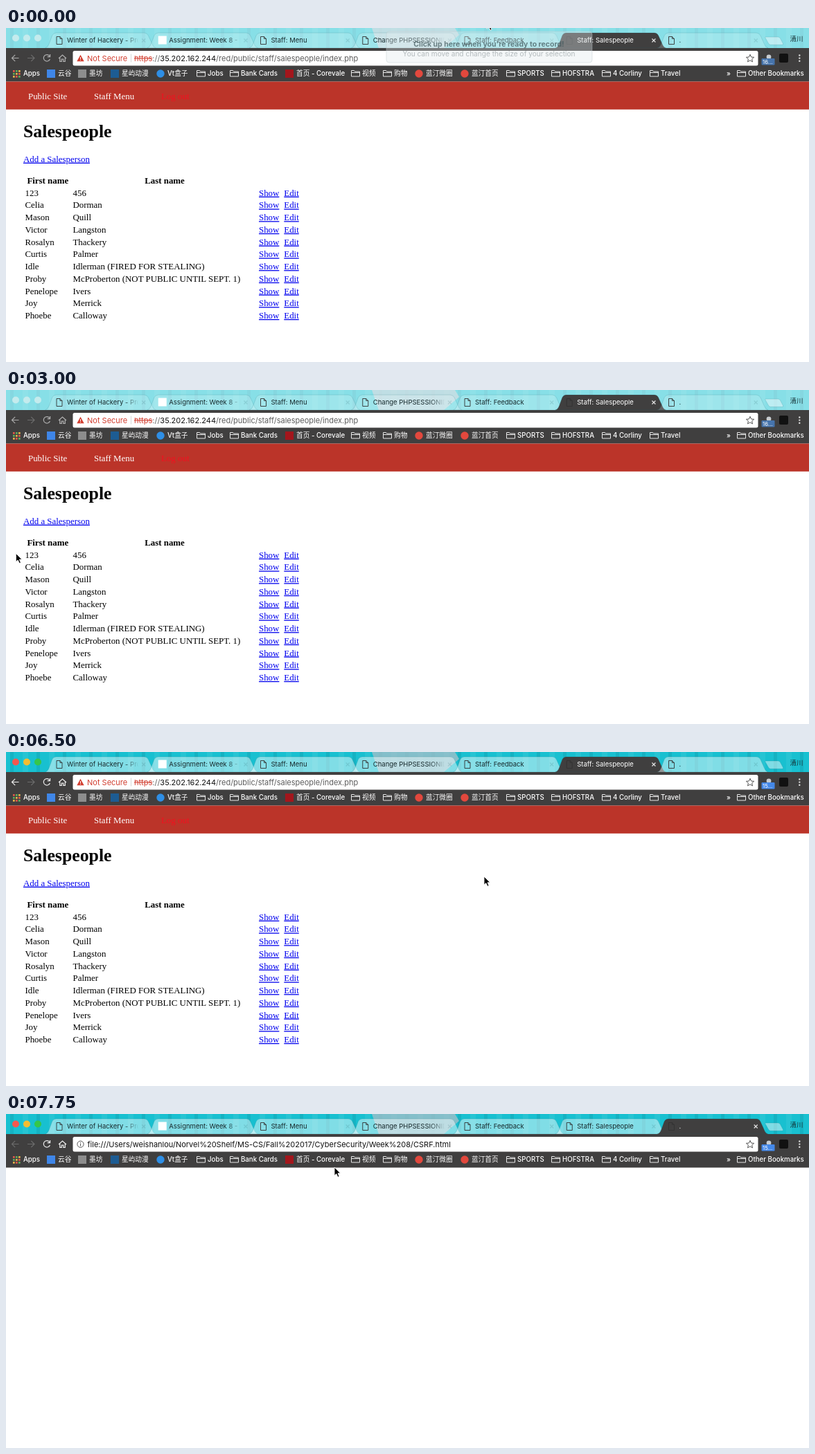
These frames come from a looping animation (1159 by 483 pixels, 8 s). An HTML page:

```html
<!DOCTYPE html>
<html lang="en">
<head>
<meta charset="utf-8">
<title>Salespeople</title>
<style>
html, body { margin: 0; width: 100%; height: 100%; overflow: hidden; background: #fff; }
svg { display: block; width: 100%; height: 100%; }
text { white-space: pre; }
.ui { font-family: Inter, "Noto Sans CJK SC", "Noto Sans CJK", sans-serif; font-size: 9.5px; }
.mark { font-size: 9.7px; font-weight: 500; fill: #fff; }
.url { font-size: 11px; fill: #111; }
.page { font-family: "Liberation Serif", "Times New Roman", serif; font-size: 12.9px; }
.link { fill: #0000ee; text-decoration: underline; }
.bold { font-weight: 700; }
.mid { text-anchor: middle; }
.line { fill: none; stroke-width: 1.2; }
</style>
</head>
<body>
<svg id="stage" viewBox="0 0 1159 483" xmlns="http://www.w3.org/2000/svg"></svg>
<script>
const LOOP = 8000, STEP = 250, PITCH = 147.25, BAR = '#403f3f';
const TITLES = ['Winter of Hackery - Pro', 'Assignment: Week 8 - Lab', 'Staff: Menu',
  'Change PHPSESSIONID', 'Staff: Feedback', 'Staff: Salespeople', '.'];
const PEOPLE = ['123|456', 'Celia|Dorman', 'Mason|Quill', 'Victor|Langston', 'Rosalyn|Thackery',
  'Curtis|Palmer', 'Idle|Idlerman (FIRED FOR STEALING)',
  'Proby|McProberton (NOT PUBLIC UNTIL SEPT. 1)', 'Penelope|Ivers', 'Joy|Merrick', 'Phoebe|Calloway'];
// label, x, icon: f = folder, s = square, c = circle
const MARKS = [['Apps', 25, ''], ['云谷', 75, 's#3f86e8'], ['墨坊', 120, 's#8d8d8d'],
  ['星屿动漫', 167, 's#1d5c93'], ['Vt盒子', 233, 'c#2e8fe6'], ['Jobs', 291, 'f'],
  ['Bank Cards', 339, 'f'], ['首页 - Corevale', 419, 's#a3161c'], ['视频', 514, 'f'],
  ['购物', 560, 'f'], ['蓝汀微圈', 606, 'c#e2483d'], ['蓝汀首页', 672, 'c#e2483d'],
  ['SPORTS', 738, 'f'], ['HOFSTRA', 803, 'f'], ['4 Corliny', 876, 'f'], ['Travel', 945, 'f'],
  ['Other Bookmarks', 1071, 'f']];
// time, x, y of the pointer tip
const PATH = [[0, 694, -11], [250, 610, 20], [500, 470, 110], [750, 399, 172], [1250, 368, 218],
  [1750, 190, 242], [2250, 22, 234], [2500, 7, 231], [3250, 18, 239], [3750, 52, 237],
  [4250, 44, 234], [4500, 22, 237], [4750, 72, 240], [5000, 150, 240], [5500, 416, 237],
  [5750, 567, 245], [6250, 567, 245], [6500, 690, 180], [6750, 890, 62], [7000, 988, 13],
  [7500, 988, 13], [7750, 474, 77]];
const CELLS = [[27, 50], [96, 119], [364.5, 397], [401, 423]];

const text = (x, y, s, cls, more = '') => `<text x="${x}" y="${y}" class="${cls}" ${more}>${s}</text>`;
const rect = (x, y, w, h, fill, more = '') =>
  `<rect x="${x}" y="${y}" width="${w}" height="${h}" fill="${fill}" ${more}/>`;
const circle = (x, y, r, fill, more = '') => `<circle cx="${x}" cy="${y}" r="${r}" fill="${fill}" ${more}/>`;
const path = (d, more) => `<path d="${d}" ${more}/>`;

function fade(id, color) {
  return `<linearGradient id="${id}" gradientUnits="userSpaceOnUse" x1="31" y1="0" x2="135" y2="0">
    <stop offset=".8" stop-color="${color}"/><stop offset="1" stop-color="${color}" stop-opacity="0"/></linearGradient>`;
}

function tab(title, i) {
  const icon = i === 1 ? rect(16, 11.5, 12, 12, '#fff')
    : path('M16.5 12.5h5l3 3v8h-8zM21.5 12.5v3h3', 'class="line" style="stroke-width:.9" stroke="#333"');
  return `<g class="tab" transform="translate(${56.5 + PITCH * i})">
    ${path('M0 29Q4 28 6 22L10 11Q12 7 16 7H143Q147 7 149 11L154 22Q156 28 160 29Z', 'stroke="#176972" stroke-opacity=".24" stroke-width=".7"')}
    ${icon}${text(31.5, 21, title, 'ui')}
    ${path('M139.7 15.5l5 5m0-5l-5 5', 'class="line close"')}</g>`;
}

function bookmark([label, x, icon]) {
  const color = icon.slice(1);
  let mark = '';
  if (icon === 'f') mark = path(`M${x - 15.5} 70v-8.5h4l1.2 1.5h6.8v7zM${x - 15.5} 64.5h12`,
    'class="line" style="stroke-width:1" stroke="#e6e6e6"');
  else if (icon[0] === 's') mark = rect(x - 16, 60, 12, 12, color);
  else if (icon[0] === 'c') mark = circle(x - 10, 66, 5.7, color);
  else for (let n = 0; n < 9; n++)
    mark += rect(10 + n % 3 * 4, 61 + (n / 3 | 0) * 4, 2.7, 2.7, ['#e25a4b', '#5fae5b', '#e8b34a'][(n + (n / 3 | 0)) % 3]);
  return mark + text(x, 69.4, label, 'ui mark');
}

function person(row, i) {
  const y = (242.7 + 17.73 * i).toFixed(1), [first, last] = row.split('|');
  return text(27.5, y, first, 'page') + text(96.5, y, last, 'page')
    + text(365, y, 'Show', 'page link') + text(401.3, y, 'Edit', 'page link');
}

const stage = document.getElementById('stage');
stage.innerHTML = `<defs>${fade('ink', '#16292c')}${fade('pale', '#fff')}
  <pattern id="bars" width="38" height="29" patternUnits="userSpaceOnUse">
    ${rect(6, 0, 5, 29, '#087f93', 'opacity=".22"')}${rect(24, 0, 8, 29, '#fff', 'opacity=".06"')}</pattern></defs>
  ${rect(0, 0, 1159, 483, '#fff')}
  ${rect(0, 0, 1159, 30, '#18c0d0')}${rect(0, 0, 1159, 30, 'url(#bars)')}
  ${path('M538 29L528 0H648L654 10L632 29Z', 'fill="#a9bfc9" opacity=".75"')}
  <rect id="veil" width="1159" height="30" fill="#fff" opacity=".48"/>
  <g id="lights">${[14, 30, 46].map(x => circle(x, 14.5, 5)).join('')}</g>
  <g id="tabs">${TITLES.map(tab).join('')}</g>
  ${path('M1096.5 13h18q2 0 3 2l4 7.5q.8 1.8-1 1.8h-17q-2 0-3-2l-4.5-8q-.5-1.3.5-1.3z', 'fill="#fff" fill-opacity=".45" stroke="#176972" stroke-opacity=".25" stroke-width=".7"')}
  ${text(1131.5, 18.8, '清川', 'ui', 'fill="#163034"')}
  ${rect(0, 29, 1159, 48.5, BAR)}
  ${path('M18.5 43.5h-10m4.7-4.7l-4.7 4.7l4.7 4.7', 'id="back" class="line"')}
  ${path('M31 43.5h10m-4.7-4.7l4.7 4.7l-4.7 4.7', 'class="line" stroke="#6c6c6c"')}
  <g id="tools">
    ${path('M62.8 40.6A4.7 4.7 0 1 0 63.4 45M63.6 38v3.7h-3.8', 'class="line"')}
    ${path('M76 44l5.5-5l5.5 5M77.8 43.3v5h2.5v-3.2h2.5v3.2h2.5v-5', 'class="line"')}
  </g>
  ${rect(96.5, 33, 989, 21.5, '#fff', 'rx="2.5"')}
  <g id="webUrl">
    ${path('M107.5 38.8l5.2 9.4h-10.4z', 'fill="#d23f31"')}${rect(107, 42, 1, 3.2, '#fff')}${rect(107, 46, 1, 1, '#fff')}
    ${text(117, 47.7, 'Not Secure', 'ui url', 'style="fill:#d23f31"')}
    ${rect(180, 37.5, .8, 12, '#ccc')}
    ${text(185, 47.7, '<tspan fill="#d23f31" text-decoration="line-through">https</tspan><tspan fill="#666">://</tspan>35.202.162.244<tspan fill="#5c5c5c">/red/public/staff/salespeople/index.php</tspan>', 'ui url')}
  </g>
  <g id="fileUrl">
    ${circle(107.5, 43.7, 4.6, 'none', 'stroke="#555" stroke-width="1"')}
    ${rect(107, 41, 1, 1.2, '#555')}${rect(107, 43, 1, 3.4, '#555')}
    ${text(117.5, 47.7, 'file:///Users/weishanlou/Norvel%20Shelf/MS-CS/Fall%202017/CyberSecurity/Week%208/CSRF.html', 'ui url')}
  </g>
  ${path('M1074 38.3l1.6 3.7l4 .3l-3 2.6l.9 4l-3.5-2.1l-3.5 2.1l.9-4l-3-2.6l4-.3z', 'class="line" style="stroke-width:1" stroke="#555"')}
  ${circle(1101, 41.8, 3.4, '#c8ccd0')}
  <rect id="badge" x="1090.5" y="44" width="19" height="9.5" rx="1"/>
  <text id="count" x="1092" y="51.6" class="ui" style="font-size:7.8px" fill="#fff"></text>
  ${rect(1116, 37, 13, 13, '#111', 'rx="2"')}
  ${[39.5, 43.6, 47.7].map(y => circle(1145.3, y, 1.2, '#ddd')).join('')}
  ${MARKS.map(bookmark).join('')}${text(1040, 69, '»', 'ui mark')}
  <g id="page">
    ${rect(0, 77.5, 1159, 40.3, '#bb3429')}
    ${text(32, 102.5, 'Public Site', 'page', 'fill="#fff"')}
    ${text(127, 102.5, 'Staff Menu', 'page', 'fill="#fff"')}
    ${text(224, 102.5, 'Log out', 'page', 'fill="#f3101f"')}
    ${text(25, 158.2, 'Salespeople', 'page bold', 'style="font-size:25.8px"')}
    ${text(25, 193.7, 'Add a Salesperson', 'page link')}
    ${text(60.3, 225, 'First name', 'page bold mid')}
    ${text(229, 225, 'Last name', 'page bold mid')}
    <g id="picked">${CELLS.map(([x]) => rect(x, 231.3, 0, 14.6, '#b2d5fc')).join('')}</g>
    ${PEOPLE.map(person).join('')}
  </g>
  <g id="hint">
    ${rect(549, 5, 297, 45, '#dfe8ea', 'rx="4" fill-opacity=".36" stroke="#b9c6c8" stroke-opacity=".4"')}
    ${text(697, 26.5, "Click up here when you're ready to record!", 'ui bold mid', 'style="font-size:10.5px" fill="#40575c" fill-opacity=".72"')}
    ${text(697, 40.6, 'You can move and change the size of your selection', 'ui mid', 'style="font-size:10.1px" fill="#8c9699" fill-opacity=".62"')}
  </g>
  ${path('M0 0V12.2L2.8 9.6L5 14.3L7.1 13.4L5 8.8H8.8Z', 'id="pointer" fill="#000" stroke="#fff" stroke-width=".9" stroke-linejoin="round"')}`;

const el = id => document.getElementById(id);
const set = (node, name, value) => node.setAttribute(name, value);
const show = (id, on) => set(el(id), 'visibility', on ? 'visible' : 'hidden');
const tabs = [...stage.querySelectorAll('.tab')];

function pointerAt(t) {
  const n = PATH.findIndex(p => p[0] >= t);
  if (n < 1) return PATH[0].slice(1);
  const [t0, x0, y0] = PATH[n - 1], [t1, x1, y1] = PATH[n], k = (t - t0) / (t1 - t0);
  return [x0 + (x1 - x0) * k, y0 + (y1 - y0) * k];
}

function draw(time) {
  const t = Math.floor(time % LOOP / STEP) * STEP;
  const [x, y] = pointerAt(t);
  const lit = t >= 3250, file = t >= 7250, active = file ? 6 : 5;
  const hover = !file && t >= 7000;

  set(el('pointer'), 'transform', `translate(${x.toFixed(1)} ${y.toFixed(1)})`);
  set(el('veil'), 'opacity', lit ? 0 : .48);
  show('hint', t < STEP);
  show('page', !file);
  show('webUrl', !file);
  show('fileUrl', file);

  [...el('lights').children].forEach((c, i) =>
    set(c, 'fill', lit ? ['#f4584f', '#f6bd30', '#36c64a'][i] : '#c4ebed'));
  set(el('back'), 'stroke', file ? '#6c6c6c' : lit ? '#eee' : '#aaa');
  set(el('tools'), 'stroke', lit ? '#eee' : '#b0b0b0');
  set(el('badge'), 'fill', lit ? '#4488e8' : '#4674ac');
  el('count').textContent = lit ? '15...' : '16...';

  tabs.forEach((g, i) => {
    const on = i === active, over = hover && i === 6;
    set(g.firstElementChild, 'fill', on ? BAR : over ? '#729ea2' : `rgba(255,255,255,${lit ? .45 : .18})`);
    set(g.querySelector('text'), 'fill', on ? 'url(#pale)' : 'url(#ink)');
    set(g.querySelector('.close'), 'stroke', on || over ? '#e4e4e4' : 'rgba(30,80,85,.15)');
  });

  const dragging = t >= 4750 && t < 6000;
  [...el('picked').children].forEach((r, i) => {
    const [a, b] = CELLS[i];
    set(r, 'width', dragging ? Math.max(0, Math.min(b, x + 2) - a) : 0);
  });
}

const start = performance.now();
(function tick() {
  draw(performance.now() - start);
  requestAnimationFrame(tick);
})();
</script>
</body>
</html>
```
